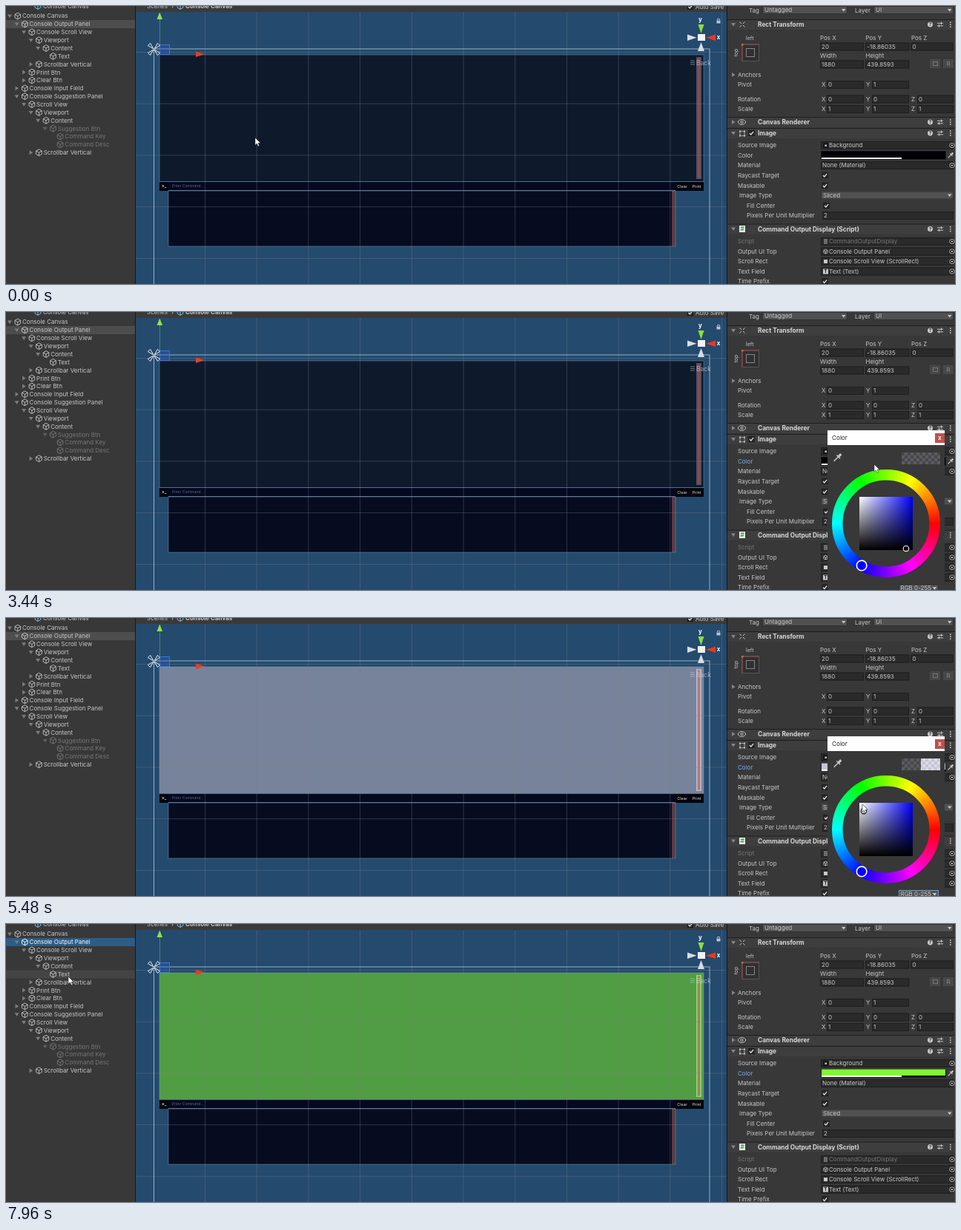
These frames come from a looping animation (1280x376 px, 8000 ms). An HTML page with a canvas:

```html
<!DOCTYPE html>
<html lang="en">
<head>
<meta charset="utf-8">
<title>Console colour picking</title>
<style>
html, body { margin: 0; width: 100%; height: 100%; overflow: hidden; background: #383838; }
canvas { display: block; width: 1280px; height: 376px; }
</style>
</head>
<body>
<canvas id="stage" width="1280" height="376"></canvas>
<script>
const ctx = document.getElementById('stage').getContext('2d');
const LOOP = 8000, STEP = 40, TAU = Math.PI * 2;
const FONT = 'Inter, Roboto, sans-serif';
const INK = '#c8c8c8', DIM = '#767676', FIELD = '#2a2a2a', EDGE = '#1f1f1f';
const WHEEL = { x: 1187, y: 286, inner: 58.5, outer: 73 };
const SQUARE = { x: 1151, y: 250, size: 72 };
const ALPHA = 0.64;

// ---- timing ----
const SELECT = 1240, OPEN = 3080, GRAB = 4320, DROP = 5600, HUE = 5880, REGRAB = 6160, SETTLE = 6720, CLOSE = 7880;

// cursor stops: time, x, y
const PATH = [
  [0, 336, 178], [80, 336, 178], [880, 112, 31], [920, 112, 31], [960, 109, 29], [1480, 109, 29],
  [1960, 825, 177], [2280, 1138, 206], [2320, 1138, 206], [2640, 1165, 202], [3400, 1165, 202],
  [3440, 1171, 206], [4120, 1216, 304], [4320, 1216, 304], [4560, 1216, 299.5], [5000, 1192, 288],
  [5320, 1162, 276], [5480, 1155, 252], [5560, 1154, 250], [5600, 1154, 250], [5880, 1179, 222],
  [5960, 1179, 222], [6160, 1185, 260], [6660, 1208, 252], [7040, 1208, 252], [7840, 84, 71], [8000, 84, 71]
];

function slope(i, k) {
  const a = PATH[i - 1], b = PATH[i], c = PATH[i + 1];
  if (!a || !c) return 0;
  const still = p => p[1] === b[1] && p[2] === b[2];
  return still(a) || still(c) ? 0 : (c[k] - a[k]) / (c[0] - a[0]);
}

function cursorAt(t) {
  let i = 0;
  while (i < PATH.length - 2 && PATH[i + 1][0] <= t) i++;
  const a = PATH[i], b = PATH[i + 1], d = b[0] - a[0], u = (t - a[0]) / d;
  const u2 = u * u, u3 = u2 * u;
  return [1, 2].map(k =>
    a[k] * (2 * u3 - 3 * u2 + 1) + b[k] * (3 * u2 - 2 * u3) +
    d * (slope(i, k) * (u3 - 2 * u2 + u) + slope(i + 1, k) * (u3 - u2)));
}

function handleAt(t) {
  if (t < GRAB) return [1214, 320];
  const lag = t - 60;
  const when = t < REGRAB ? Math.min(Math.max(lag, GRAB), DROP)
                          : Math.min(Math.max(lag, REGRAB), SETTLE);
  const clamp = (v, lo) => Math.min(Math.max(v, lo), lo + SQUARE.size);
  const [x, y] = cursorAt(when);
  return [clamp(x, SQUARE.x), clamp(y, SQUARE.y)];
}

function hsv(h, s, v) {
  return [5, 3, 1].map(n => {
    const k = (n + h / 60) % 6;
    return 255 * (v - v * s * Math.max(0, Math.min(k, 4 - k, 1)));
  });
}
const css = (c, a = 1) => `rgba(${c.map(Math.round).join(',')},${a})`;

// ---- drawing helpers ----
function box(x, y, w, h, fill, line) {
  if (fill) { ctx.fillStyle = fill; ctx.fillRect(x, y, w, h); }
  if (line) { ctx.strokeStyle = line; ctx.lineWidth = 1; ctx.strokeRect(x + 0.5, y + 0.5, w - 1, h - 1); }
}
// outline centred on the edges
function rim(x, y, w, h, color) {
  ctx.strokeStyle = color;
  ctx.lineWidth = 1;
  ctx.strokeRect(x, y, w, h);
}
function text(s, x, y, { color = INK, size = 8, style = '', align = 'left' } = {}) {
  ctx.font = `${style} ${size}px ${FONT}`;
  ctx.textAlign = align;
  ctx.fillStyle = color;
  ctx.fillText(s, x, y + size * 0.36);
}
function shape(points, fill, line, width = 1) {
  ctx.beginPath();
  points.forEach(p => ctx.lineTo(p[0], p[1]));
  ctx.closePath();
  if (fill) { ctx.fillStyle = fill; ctx.fill(); }
  if (line) { ctx.strokeStyle = line; ctx.lineWidth = width; ctx.stroke(); }
}
function stroke(color, width, ...lines) {
  ctx.strokeStyle = color;
  ctx.lineWidth = width;
  ctx.beginPath();
  for (const [x1, y1, x2, y2] of lines) { ctx.moveTo(x1, y1); ctx.lineTo(x2, y2); }
  ctx.stroke();
}
function ring(x, y, r, color, width, fill) {
  ctx.beginPath();
  ctx.arc(x, y, r, 0, TAU);
  if (fill) { ctx.fillStyle = fill; ctx.fill(); }
  ctx.strokeStyle = color;
  ctx.lineWidth = width;
  ctx.stroke();
}
function fold(x, y, open, color = '#858585') {
  shape(open ? [[x - 3, y - 2], [x + 3, y - 2], [x, y + 2.6]]
             : [[x - 2, y - 3], [x - 2, y + 3], [x + 2.6, y]], color);
}
function cube(x, y, color, r = 4.4) {
  const corner = k => [x + r * Math.sin(k * TAU / 6), y - r * Math.cos(k * TAU / 6)];
  shape([0, 1, 2, 3, 4, 5].map(corner), null, color, 0.9);
  stroke(color, 0.9, ...[1, 3, 5].map(k => [x, y, ...corner(k)]));
}
function check(x, y) {
  box(x - 4, y - 4, 8, 8, FIELD, '#191919');
  ctx.strokeStyle = '#e0e0e0';
  ctx.lineWidth = 1.3;
  ctx.beginPath();
  ctx.moveTo(x - 2.5, y);
  ctx.lineTo(x - 0.7, y + 2);
  ctx.lineTo(x + 2.7, y - 2.2);
  ctx.stroke();
}
function pipette(x, y, s) {
  stroke('#c8c8c8', 1.3 * s, [x - 4 * s, y + 4 * s, x + s, y - s]);
  stroke('#c8c8c8', 2.6 * s, [x + s, y - s, x + 4 * s, y - 4 * s]);
  stroke('#c8c8c8', 1.2 * s, [x - s, y - 3 * s, x + 3 * s, y + s]);
}

// ---- hierarchy ----
// depth, fold (v open, > closed, - none), label, dimmed
const TREE = [
  [0, 'v', 'Console Canvas'], [1, 'v', 'Console Output Panel'], [2, 'v', 'Console Scroll View'],
  [3, 'v', 'Viewport'], [4, 'v', 'Content'], [5, '-', 'Text'], [3, '>', 'Scrollbar Vertical'],
  [2, '>', 'Print Btn'], [2, '>', 'Clear Btn'], [1, '>', 'Console Input Field'],
  [1, 'v', 'Console Suggestion Panel'], [2, 'v', 'Scroll View'], [3, 'v', 'Viewport'],
  [4, 'v', 'Content'], [5, 'v', 'Suggestion Btn', 1], [6, '-', 'Command Key', 1],
  [6, '-', 'Command Desc', 1], [3, '>', 'Scrollbar Vertical']
];

function hierarchy(t) {
  box(0, 0, 174, 376, '#383838');
  const active = (t >= SELECT && t < OPEN) || t >= CLOSE;
  box(0, 19, 174, 11, active ? '#2c5d87' : '#4d4d4d');
  if (t >= CLOSE) box(0, 62.5, 174, 11, '#444444');
  cube(43, 0, '#7fc8f0');
  text('Console Canvas', 50, 0.3);
  TREE.forEach(([depth, mark, label, dim], i) => {
    const x = 22 + 9.55 * depth, y = 13.6 + 10.86 * i;
    const color = dim ? DIM : i === 1 && active ? '#ffffff' : INK;
    if (mark !== '-') fold(x - 17, y, mark === 'v', dim ? '#606060' : '#7d7d7d');
    cube(x - 6.2, y, color);
    text(label, x, y, { color });
  });
  box(174, 0, 1, 376, '#191919');
}

// ---- scene view ----
function axes() {
  shape([[933.5, 25], [941.5, 25], [937.5, 37]], '#8ee03c');
  shape([[957, 38.5], [957, 47], [944, 42.7]], '#e8391c');
  shape([[919, 38.5], [919, 47], [931.5, 42.7]], '#d9dde0');
  shape([[933, 61], [942, 61], [937.5, 49]], '#d9dde0');
  box(933, 38, 10, 9, '#f2f2f2');
  text('y', 936.5, 18, { color: '#fff', style: 'bold', align: 'center' });
  text('x', 961, 42, { color: '#fff', style: 'bold', align: 'center' });
  box(958.5, 19.5, 5, 4, '#b9c4cf');
  ctx.strokeStyle = '#b9c4cf';
  ctx.lineWidth = 1;
  ctx.beginPath();
  ctx.arc(961, 19, 1.8, Math.PI, 0);
  ctx.stroke();
  const pale = 'rgba(205,214,222,.7)';
  stroke(pale, 0.7, [923, 74, 929, 74], [923, 76.5, 929, 76.5], [923, 79, 929, 79]);
  text('Back', 931, 76.5, { color: pale, size: 8.5 });
}

function scene(color) {
  const tint = base => base.map((b, i) => b + 0.53 * color[i]);
  ctx.save();
  ctx.beginPath();
  ctx.rect(175, 0, 797, 376);
  ctx.clip();
  box(175, 8, 797, 368, '#244a6e');

  box(207, 66, 734, 171, css(tint([14, 26, 40])));
  box(931, 69, 7, 165, css(tint([82, 80, 90])));
  box(932.7, 70.5, 3.6, 162, css([124, 80, 82].map((c, i) => c + 0.22 * color[i])));
  box(219, 250, 684, 75, '#070b1f');
  box(898, 250, 5, 75, '#5a3b44');
  box(207, 237, 734, 13, '#050920');
  box(207, 238, 12, 12, '#03040c');
  box(903, 238, 18, 12, '#03040c');
  box(922, 238, 19, 12, '#03040c');

  const grid = 'rgba(128,128,128,.34)';
  for (let x = 268; x < 972; x += 69.7) box(x, 8, 1, 368, grid);
  for (let y = 62; y < 376; y += 69.7) box(175, y, 797, 1, grid);

  const edge = 'rgba(120,160,200,.45)';
  rim(207, 66, 734, 171.5, edge);
  rim(219, 250, 684, 75, edge);
  box(207, 237, 734, 1, 'rgba(130,160,190,.4)');
  box(219, 249, 684, 1, 'rgba(150,170,190,.6)');
  rim(199.5, 58, 749.5, 330, 'rgba(190,212,230,.75)');

  text('>_', 210, 243, { color: '#fff', size: 5.5, style: 'bold' });
  text('Enter Command...', 224, 243.5, { color: '#60667c', size: 5, style: 'italic' });
  text('Clear', 912, 243.7, { color: '#e8e8e8', size: 5.3, align: 'center' });
  text('Print', 931.5, 243.7, { color: '#e8e8e8', size: 5.3, align: 'center' });

  box(207, 17, 1, 49, 'rgba(140,220,90,.4)');
  shape([[203.5, 18], [211, 18], [207.3, 8.5]], '#8de63a');
  shape([[256, 61.5], [256, 69], [268, 65.3]], '#e2401f');
  box(207, 52, 14, 14, 'rgba(40,90,200,.35)', '#3c74d8');
  for (let k = 0; k < 4; k++) {
    const a = Math.PI / 4 + k * TAU / 4;
    const at = (r, off) => [199.5 + r * Math.cos(a + off), 58.5 + r * Math.sin(a + off)];
    shape([at(1, 0), at(9.5, -0.24), at(9.5, 0.24)], null, '#eef2f5', 1);
  }
  axes();

  box(175, 0, 797, 8, '#3a3a3a');
  text('Scenes', 190, 0.3);
  text('›', 223, 0.3);
  cube(235, 0, '#7fc8f0');
  text('Console Canvas', 242, 0.3, { style: 'bold' });
  check(923, 1);
  text('Auto Save', 930, 1);
  ctx.restore();
  box(972, 0, 1, 376, '#191919');
}

// ---- inspector ----
function field(x, y, w, s = '') {
  box(x, y - 5.5, w, 11, FIELD, EDGE);
  text(s, x + 2, y);
}
function dropdown(x, y, w, s) {
  box(x, y - 5.5, w, 11, '#515151', '#303030');
  text(s, x + 3, y);
  shape([[x + w - 8, y - 1.5], [x + w - 2.5, y - 1.5], [x + w - 5.2, y + 2]], INK);
}
function section(y, label, open) {
  box(973, y - 7, 307, 14, '#3e3e3e');
  box(973, y - 7, 307, 1, '#1e1e1e');
  fold(981, y, open);
  text(label, 1014, y, { color: '#d8d8d8', size: 8.35, style: 'bold' });
  ring(1246.5, y, 3.2, INK, 0.8, INK);
  text('?', 1246.5, y, { color: '#3e3e3e', size: 6.5, style: 'bold', align: 'center' });
  stroke(INK, 1, [1256, y - 1.7, 1264, y - 1.7], [1256, y + 1.8, 1264, y + 1.8],
    [1261.5, y - 3.5, 1261.5, y], [1258.5, y, 1258.5, y + 3.6]);
  for (const d of [-3, 0, 3]) box(1273, y + d - 0.7, 1.6, 1.6, INK);
}
function picker(y) {
  ring(1276, y, 3.2, '#b0b0b0', 0.9);
  box(1275, y - 1, 2, 2, '#b0b0b0');
}
function triple(y, label, values) {
  text(label, 987, y);
  values.forEach((v, i) => {
    text('XYZ'[i], 1100 + 61 * i - (i ? 1 : 0), y);
    field(1107 + 61 * i, y, i === 2 ? 49 : 50, v);
  });
}
function reference(y, label, value, dim) {
  const color = dim ? DIM : INK;
  text(label, 987, y, { color });
  field(1099, y, 179);
  text(value, 1110, y, { color });
  picker(y);
}

function inspector(t, color) {
  box(973, 0, 307, 376, '#383838');
  text('Tag', 1002, 6);
  dropdown(1020, 5.5, 115, 'Untagged');
  text('Layer', 1145, 6);
  dropdown(1170, 5.5, 108, 'UI');

  section(25, 'Rect Transform', true);
  for (const [dx, dy] of [[-1, -1], [1, -1], [-1, 1], [1, 1]])
    stroke(INK, 1, [993 + dx, 25 + dy, 993 + 3.5 * dx, 25 + 3.5 * dy]);
  text('left', 998, 43, { size: 7 });
  ctx.save();
  ctx.translate(984, 63);
  ctx.rotate(-Math.PI / 2);
  text('top', 0, 0, { size: 7, align: 'center' });
  ctx.restore();
  box(992, 51, 24, 24, '#303030', '#555555');
  box(998, 57, 12, 12, null, '#858585');
  stroke('#7c4038', 1, [993.5, 52, 993.5, 74], [993, 52.5, 1015, 52.5]);
  box(992, 51, 2.5, 2.5, '#d0644a');

  ['Pos X', 'Pos Y', 'Pos Z'].forEach((s, i) => {
    text(s, 1098 + 61.5 * i, 43);
    field(1098 + 61.2 * i, 55, i === 2 ? 57 : 59, ['20', '-18.86035', '0'][i]);
  });
  ['Width', 'Height'].forEach((s, i) => {
    text(s, 1098 + 61.5 * i, 67);
    field(1098 + 61.2 * i, 79, 59, ['1880', '439.8593'][i]);
  });
  box(1246, 72, 14, 12, '#484848');
  ctx.setLineDash([2, 1]);
  box(1250, 75, 7, 6, null, '#8a8a8a');
  ctx.setLineDash([]);
  box(1264, 72, 14, 12, '#484848');
  text('R', 1271, 78, { color: '#8a8a8a', align: 'center' });

  fold(981, 93, false);
  text('Anchors', 987, 93);
  triple(106.5, 'Pivot', ['0', '1']);
  triple(126, 'Rotation', ['0', '0', '0']);
  triple(139.5, 'Scale', ['1', '1', '1']);

  section(157, 'Canvas Renderer', false);
  ctx.beginPath();
  ctx.ellipse(992.5, 157, 5, 3.4, 0, 0, TAU);
  ctx.strokeStyle = INK;
  ctx.stroke();
  ring(992.5, 157, 1.5, INK, 1);

  section(172, 'Image', true);
  rim(990, 169.5, 6, 6, '#9a9a9a');
  for (const dx of [-3, 3])
    for (const dy of [-3, 3]) box(992 + dx, 171.5 + dy, 2, 2, INK);
  check(1005.5, 172);
  reference(188.5, 'Source Image', 'Background');
  box(1102, 185, 7, 7, '#161616');
  box(1104.5, 187.5, 2.5, 2.5, INK);
  text('Color', 987, 202, { color: t >= OPEN ? '#7bacf2' : INK });
  box(1099, 196, 169, 12, EDGE);
  box(1100, 196.5, 167, 8.5, css(color));
  box(1100, 205, 167, 2, '#000');
  box(1100, 205, 108, 2, '#fff');
  pipette(1274, 202, 0.85);
  text('Material', 987, 215.5);
  field(1099, 215.5, 179, 'None (Material)');
  picker(215.5);
  text('Raycast Target', 987, 229);
  check(1104.5, 229);
  text('Maskable', 987, 243);
  check(1104.5, 243);
  text('Image Type', 989, 256.5);
  dropdown(1099, 256, 179, 'Sliced');
  text('Fill Center', 999, 270);
  check(1106.5, 270);
  text('Pixels Per Unit Multiplier', 999, 283.5);
  field(1101, 283.5, 177, '2');

  section(301.5, 'Command Output Display (Script)', true);
  box(989, 297, 8, 9, '#e4ebe4');
  text('#', 993, 301.5, { color: '#3f9b4c', style: 'bold', align: 'center' });
  reference(318.5, 'Script', 'CommandOutputDisplay', true);
  box(1103, 315, 5, 7, '#6b6b6b');
  reference(332, 'Output UI Top', 'Console Output Panel');
  cube(1105.5, 332, INK, 3);
  reference(345.5, 'Scroll Rect', 'Console Scroll View (ScrollRect)');
  box(1103, 343, 5, 5, INK);
  reference(359, 'Text Field', 'Text (Text)');
  box(1102, 355.5, 7, 7, INK);
  text('T', 1105.5, 359, { color: '#222', size: 6.5, style: 'bold', align: 'center' });
  text('Time Prefix', 987, 372.5);
  check(1104.5, 372.5);
}

// ---- colour dialog ----
function dialog(t, hue, color, [hx, hy]) {
  box(1108, 160, 158, 216, '#383838');
  box(1108, 160, 158, 20, '#ffffff');
  text('Color', 1114, 170, { color: '#222', size: 8.2 });
  box(1253, 164, 13, 13, '#c0504d');
  text('x', 1259.5, 170, { color: '#fff', style: 'bold', size: 7.5, align: 'center' });
  pipette(1121.5, 197, 1.2);

  for (let i = 0; i < 13; i++)
    for (let j = 0; j < 4; j++)
      box(1208 + 4 * i, 190 + 4 * j, 4, 4, (i + j) % 2 ? '#ffffff' : '#c8c8c8');
  box(1208, 190, 26, 16, css([1, 1, 7], ALPHA));
  box(1234, 190, 26, 16, css(color, ALPHA));

  const { x, y, inner, outer } = WHEEL;
  const spin = ctx.createConicGradient(0, x, y);
  for (let k = 0; k <= 6; k++) spin.addColorStop(k / 6, css(hsv(360 - 60 * k, 1, 1)));
  ctx.beginPath();
  ctx.arc(x, y, (inner + outer) / 2, 0, TAU);
  ctx.strokeStyle = spin;
  ctx.lineWidth = outer - inner;
  ctx.stroke();
  const a = hue * TAU / 360, mid = (inner + outer) / 2;
  ring(x + mid * Math.cos(a), y - mid * Math.sin(a), 6.8, '#fff', 1.6, css(hsv(hue, 1, 1)));

  const { x: sx, y: sy, size } = SQUARE;
  const across = ctx.createLinearGradient(sx, 0, sx + size, 0);
  across.addColorStop(0, '#fff');
  across.addColorStop(1, css(hsv(hue, 1, 1)));
  box(sx, sy, size, size, across);
  const down = ctx.createLinearGradient(0, sy, 0, sy + size);
  down.addColorStop(0, 'rgba(0,0,0,0)');
  down.addColorStop(1, '#000');
  box(sx, sy, size, size, down);
  ring(hx, hy, 3.8, hy < sy + size / 2 ? '#111' : '#fff', 1.1);

  box(1204, 368, 54, 12, '#515151', t >= GRAB ? '#6f9fd0' : '#303030');
  text('RGB 0-255', 1206.5, 373.5);
  shape([[1249.5, 372], [1255.5, 372], [1252.5, 375.5]], INK);
}

function pointer([x, y]) {
  const arrow = [[0, 0], [0, 10.2], [2.4, 8], [4, 11.8], [5.7, 11], [4.1, 7.4], [7.2, 7.2]];
  shape(arrow.map(p => [x + p[0], y + p[1]]), '#fff', 'rgba(0,0,0,.65)', 0.7);
}

function draw(t) {
  const hue = t < HUE ? 240 : 97;
  const grip = handleAt(t);
  const color = hsv(hue, (grip[0] - SQUARE.x) / SQUARE.size, 1 - (grip[1] - SQUARE.y) / SQUARE.size);
  scene(color);
  hierarchy(t);
  inspector(t, color);
  if (t >= OPEN && t < CLOSE) dialog(t, hue, color, grip);
  pointer(cursorAt(t));
}

const start = performance.now();
function tick() {
  const t = (performance.now() - start) % LOOP;
  draw(Math.floor(t / STEP) * STEP);
  requestAnimationFrame(tick);
}
tick();
</script>
</body>
</html>
```
